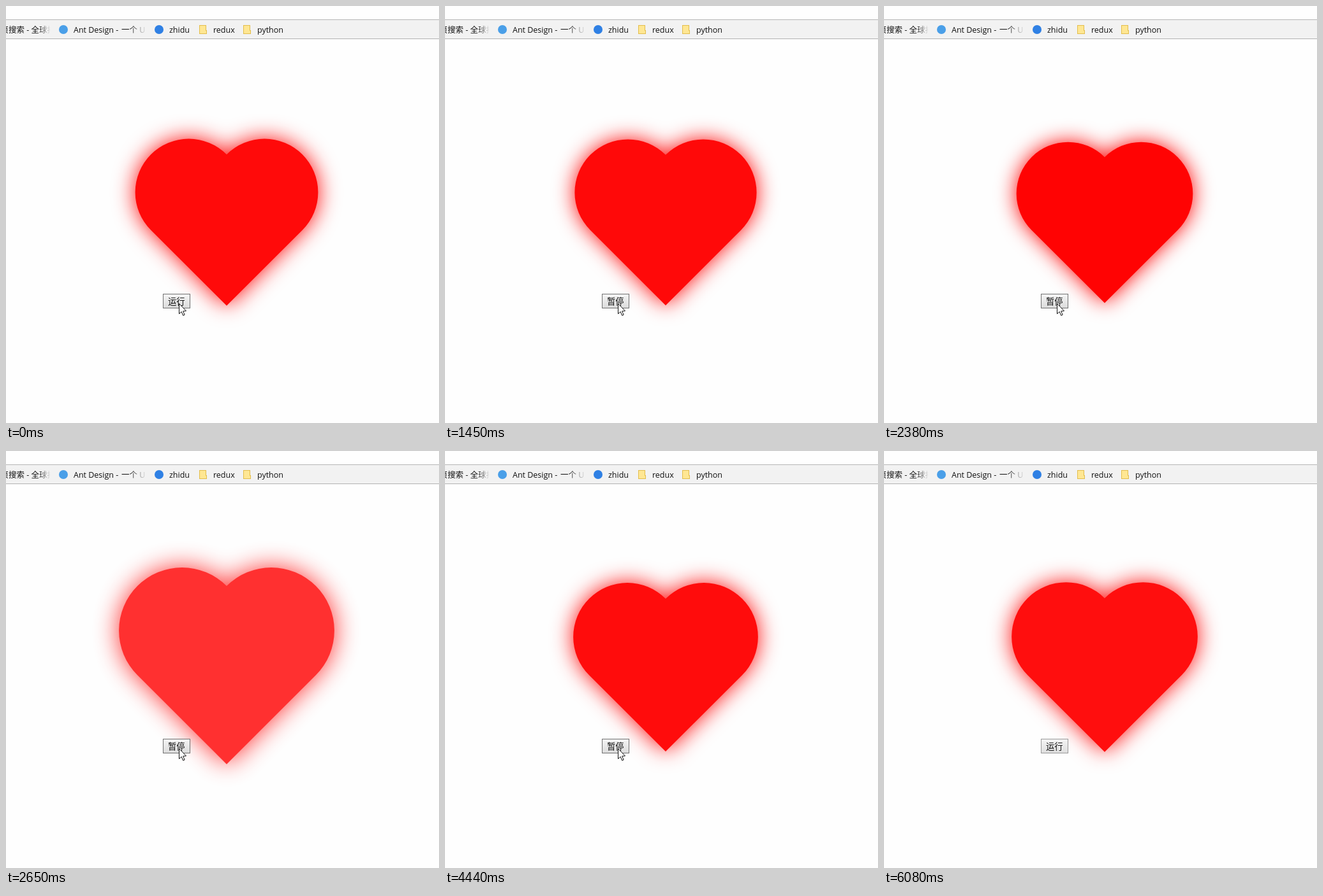
An HTML page with a canvas that plays this animation: 679 px wide and 655 px high, repeating every 6390 ms.

```html
<!DOCTYPE html>
<html lang="zh-CN">
<head>
<meta charset="utf-8">
<title>Heartbeat</title>
<style>
  html, body { margin: 0; width: 100%; height: 100%; overflow: hidden; background: #fefefe; }
  canvas { display: block; }
</style>
</head>
<body>
<canvas id="stage" width="679" height="655"></canvas>
<script>
const ctx = document.getElementById('stage').getContext('2d');
const LOOP = 6390;
const PAGE = '#fefefe';
const BAR = '#f2f2f2';
const BAR_FONT = '12.5px "Open Sans", "Noto Sans CJK SC", "Noto Sans CJK", sans-serif';
const BUTTON_FONT = '13.33px "Noto Sans CJK SC", "Noto Sans CJK", sans-serif';

// The heart beats between these moments and is paused otherwise.
const RUNS = [[460, 3160], [4440, 5660]];
const REFRESH = 135;
const LAG = 25;
const RATE = 1.025;
const FIRST_PHASE = 50;

const isRunning = t => RUNS.some(([from, to]) => t >= from && t < to);

// Running time so far, advancing once per screen refresh.
function runTime(t) {
  return RUNS.reduce((sum, [from, to]) => {
    if (t < from + LAG) return sum;
    if (t >= to) return sum + to - from;
    return sum + LAG + Math.floor((t - from - LAG) / REFRESH) * REFRESH;
  }, 0);
}

// 0 at rest, 1 at full size: a quarter of each second up, the rest down.
function beat(clock) {
  const p = clock % 1000 / 1000;
  return p < 0.25 ? p / 0.25 : (1 - p) / 0.75;
}

function rect(color, x, y, w, h) {
  ctx.fillStyle = color;
  ctx.fillRect(x, y, w, h);
}

function disc(color, x, y, r) {
  ctx.fillStyle = color;
  ctx.beginPath();
  ctx.arc(x, y, r, 0, 2 * Math.PI);
  ctx.fill();
}

function text(str, x, y, font = BAR_FONT) {
  ctx.font = font;
  ctx.fillStyle = '#111';
  ctx.fillText(str, x, y);
}

function fadeOut(x0, x1) {
  const g = ctx.createLinearGradient(x0, 0, x1, 0);
  g.addColorStop(0, 'rgba(242,242,242,0)');
  g.addColorStop(1, BAR);
  rect(g, x0, 23, x1 - x0 + 14, 27);
}

function folder(x) {
  rect('#e3bd4c', x, 30, 11, 14);
  rect('#e3bd4c', x + 9, 38, 3, 6);
  rect('#ffe793', x + 1, 31, 9, 12);
  rect('#ffe793', x + 10, 39, 1, 4);
}

function drawBar() {
  rect(BAR, 0, 21, 679, 31);
  rect('#b6b6b6', 0, 21, 679, 1);
  rect('#b3b3b3', 0, 51, 679, 1);
  text('页搜索 - 全球排', -8.5, 42);
  fadeOut(50, 70);
  disc('#4a9fe8', 90, 37, 7);
  text('Ant Design -', 106, 42);
  text('一个 U', 181, 42);
  fadeOut(192, 221);
  disc('#2f80e4', 240, 37, 7);
  text('zhidu', 256, 42);
  folder(303);
  text('redux', 325, 42);
  folder(372);
  text('python', 394, 42);
}

// A square on its corner with a half disc on each upper side.
function drawHeart(level) {
  const scale = 0.8 + 0.2 * level;
  const radius = 100 * scale;
  const lobe = radius / Math.SQRT2;
  const cx = 346, cy = 352;

  ctx.save();
  ctx.shadowColor = ctx.fillStyle = '#f00';
  ctx.shadowBlur = 40 * scale;
  ctx.beginPath();
  ctx.arc(cx - lobe, cy - lobe, radius, 0.75 * Math.PI, 1.75 * Math.PI);
  ctx.arc(cx + lobe, cy - lobe, radius, 1.25 * Math.PI, 2.25 * Math.PI);
  ctx.lineTo(cx, cy + 2 * lobe);
  ctx.fill();
  ctx.restore();

  // A veil of page colour fades heart and glow as one group.
  ctx.globalAlpha = 0.2 * level;
  rect(PAGE, 0, 0, 679, 655);
  ctx.globalAlpha = 1;
}

function drawButton(label, hover) {
  const g = ctx.createLinearGradient(0, 453, 0, 474);
  g.addColorStop(0, '#f4f4f4');
  g.addColorStop(1, hover ? '#dcdcdc' : '#dfdfdf');
  rect(hover ? '#707070' : '#999', 246, 452, 43, 23);
  rect(g, 247, 453, 41, 21);
  text(label, 254, 468.5, BUTTON_FONT);
}

function drawCursor(x, y) {
  ctx.save();
  ctx.translate(x + 0.5, y + 0.5);
  const arrow = new Path2D('M0 0V16L3.7 12.7L6.2 18.6L8.6 17.6L6.2 11.8L11 11.5Z');
  ctx.fillStyle = '#fff';
  ctx.fill(arrow);
  ctx.strokeStyle = '#111';
  ctx.stroke(arrow);
  ctx.restore();
}

function draw(t) {
  const hover = t < 5960;
  rect(PAGE, 0, 0, 679, 655);
  drawHeart(beat(FIRST_PHASE + RATE * runTime(t)));
  drawBar();
  drawButton(isRunning(t) ? '暂停' : '运行', hover);
  if (hover) drawCursor(271, 467);
  else if (t < 6080) drawCursor(371, 551);
}

function tick() {
  draw(performance.now() % LOOP);
  requestAnimationFrame(tick);
}
tick();
</script>
</body>
</html>
```
